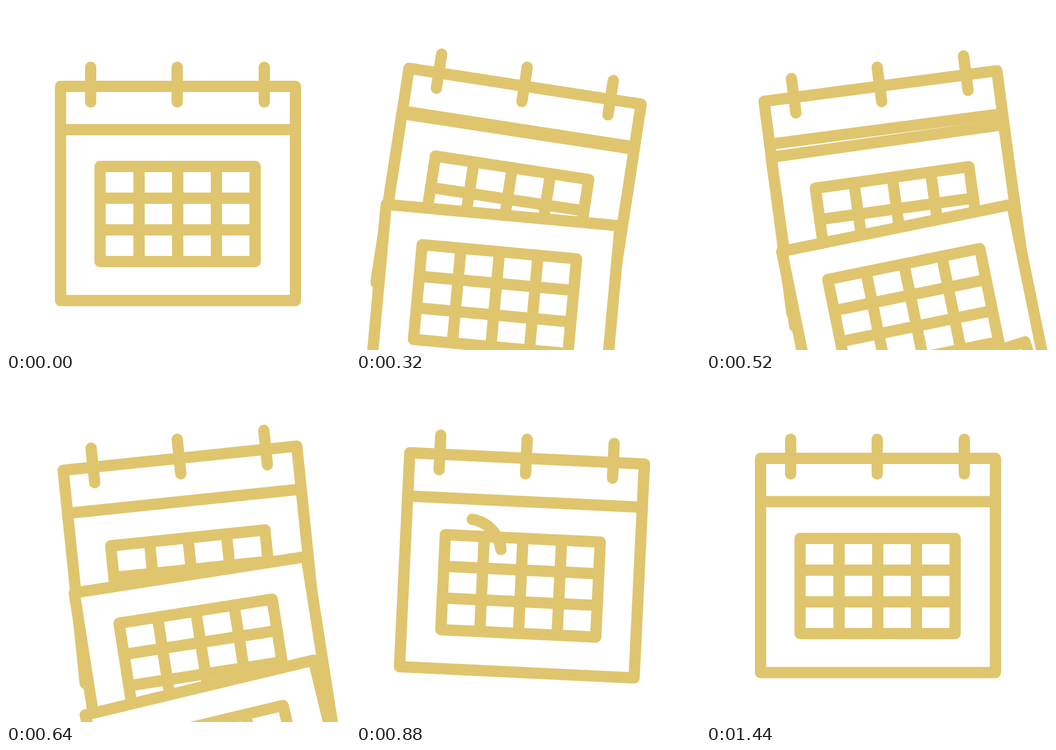
An HTML page with a canvas that plays this animation: 640 by 640 pixels, repeating every 1.48 s.

```html
<!DOCTYPE html>
<html lang="en">
<head>
<meta charset="utf-8">
<title>Calendar</title>
<style>
  html, body { margin: 0; height: 100%; overflow: hidden; background: #fff; }
  canvas { display: block; width: 640px; height: 640px; }
</style>
</head>
<body>
<canvas id="stage" width="640" height="640"></canvas>
<script>
const ctx = document.getElementById('stage').getContext('2d');
const LOOP = 1480, STEP = 40, RAD = Math.PI / 180;
const PIVOT = [318.5, 114];
const LEFT = 101.5, RIGHT = 538.5, TOP = 149.5, FOLD = 230, BOTTOM = 548;

// Swing of the whole calendar: [time, degrees]
const SWING = [[40, 0], [280, 9.8], [560, -8.5], [820, 3], [1160, 0]];
// Falling sheets, back to front: [start, duration]
const SHEETS = [[449, 580], [288, 590], [138, 500]];
const FALL = 540, TILT = -0.0219;

function ease(t, from, to) {
  const u = Math.min(1, Math.max(0, (t - from) / (to - from)));
  return u * u * (3 - 2 * u);
}

function swingAt(t) {
  let angle = 0;
  for (let i = 1; i < SWING.length; i++) {
    const [t0, a0] = SWING[i - 1], [t1, a1] = SWING[i];
    angle += (a1 - a0) * ease(t, t0, t1);
  }
  return angle;
}

function rotateAbout(x, y, degrees) {
  ctx.translate(x, y);
  ctx.rotate(degrees * RAD);
  ctx.translate(-x, -y);
}

function line(x1, y1, x2, y2) {
  ctx.beginPath();
  ctx.moveTo(x1, y1);
  ctx.lineTo(x2, y2);
  ctx.stroke();
}

function grid() {
  ctx.strokeRect(175, 298.5, 288.5, 177);
  for (const x of [247.5, 319.5, 391.5]) line(x, 298.5, x, 475.5);
  for (const y of [357.5, 416.5]) line(175, y, 463.5, y);
}

function body() {
  ctx.strokeRect(LEFT, TOP, RIGHT - LEFT, BOTTOM - TOP);
  line(LEFT, FOLD, RIGHT, FOLD);
  for (const x of [157.5, 318.5, 480.5]) line(x, 114, x, 178.5);
  grid();
}

function sheet(drop) {
  ctx.save();
  ctx.translate(0, drop);
  rotateAbout(320, 290, drop * TILT);
  ctx.fillRect(LEFT, FOLD, RIGHT - LEFT, BOTTOM - FOLD);
  ctx.strokeRect(LEFT, FOLD, RIGHT - LEFT, BOTTOM - FOLD);
  grid();
  ctx.restore();
}

// The ring is drawn on, then wiped off, while it turns
function ring(t) {
  if (t <= 800 || t >= 1440) return;
  const turn = -90 + 180 * ease(t, 800, 1385);
  const tail = turn + 360 * ease(t, 1075, 1440);
  const head = turn + 360 * ease(t, 800, 1073);
  ctx.beginPath();
  ctx.arc(206, 326, 64, tail * RAD, head * RAD);
  ctx.stroke();
}

function draw(t) {
  ctx.fillStyle = '#fff';
  ctx.fillRect(0, 0, 640, 640);
  ctx.strokeStyle = '#dfc56e';
  ctx.lineWidth = 21;
  ctx.lineCap = ctx.lineJoin = 'round';

  ctx.save();
  rotateAbout(...PIVOT, swingAt(t));
  body();
  for (const [start, duration] of SHEETS) {
    if (t > start && t < start + duration) sheet(FALL * ease(t, start, start + duration));
  }
  ctx.restore();
  ring(t);
}

function tick() {
  const t = performance.now() % LOOP;
  draw(Math.floor(t / STEP) * STEP);
  requestAnimationFrame(tick);
}
tick();
</script>
</body>
</html>
```
